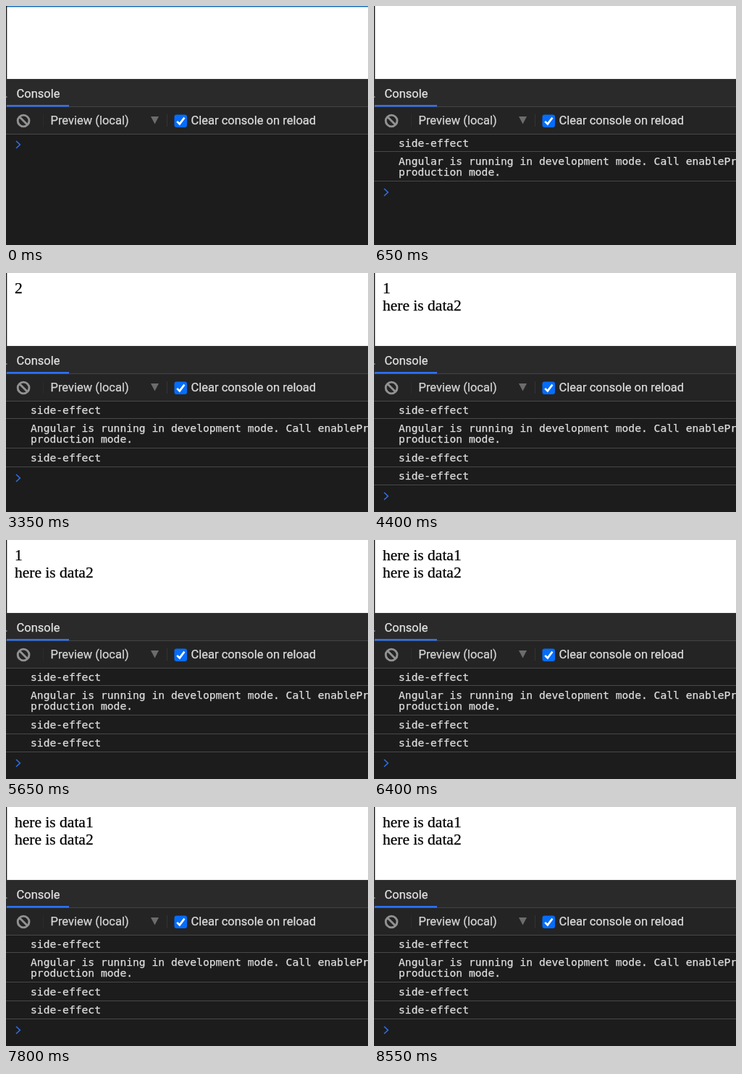
Animation of 500 by 331 pixels, one loop 8.6 s. Source, as an HTML page with a canvas:

```html
<!DOCTYPE html>
<html lang="en">
<head>
<meta charset="utf-8">
<title>Console</title>
<style>
html, body { margin: 0; width: 100%; height: 100%; overflow: hidden; background: #1c1c1c; }
canvas { display: block; width: 500px; height: 331px; }
</style>
</head>
<body>
<canvas id="stage" width="500" height="331"></canvas>
<script>
const ctx = document.getElementById('stage').getContext('2d');
const LOOP = 8600;
const UI = '16.5px Roboto, Arial, sans-serif';
const MONO = '14.65px "DejaVu Sans Mono", Menlo, monospace';
const SERIF = '21.5px "Liberation Serif", Times, serif';

// Each state: start time, page lines, number of console messages
const states = [
  { at: 0, page: [], count: 0 },
  { at: 350, page: [], count: 2 },
  { at: 2250, page: ['2'], count: 3 },
  { at: 4100, page: ['1', 'here is data2'], count: 4 },
  { at: 6050, page: ['here is data1', 'here is data2'], count: 4 }
];

const messages = [
  { lines: ['side-effect'], base: 195, end: 201 },
  { lines: ['Angular is running in development mode. Call enableProdMode() to enable',
            'production mode.'], base: 220, end: 242 },
  { lines: ['side-effect'], base: 261, end: 268 },
  { lines: ['side-effect'], base: 286, end: 293 }
];

function rect(x, y, w, h, color) {
  ctx.fillStyle = color;
  ctx.fillRect(x, y, w, h);
}

// A hairline stroke gives the slightly heavier smoothing of the glyphs
function text(str, x, y, font, color) {
  ctx.font = font;
  ctx.fillStyle = ctx.strokeStyle = color;
  ctx.lineWidth = 0.25;
  ctx.fillText(str, x, y);
  ctx.strokeText(str, x, y);
}

function line(points, width, color) {
  ctx.beginPath();
  points.forEach(([x, y]) => ctx.lineTo(x, y));
  ctx.lineWidth = width;
  ctx.strokeStyle = color;
  ctx.stroke();
}

function drawPage(state) {
  rect(0, 0, 500, 101, '#fff');
  state.page.forEach((str, i) => text(str, 12, 28 + i * 24, SERIF, '#000'));
  if (state.count === 0) rect(0, 0, 500, 1.4, '#1267b8');
}

function drawTabs() {
  rect(0, 101, 500, 38, '#2a2a2a');
  rect(0, 101, 500, 1, '#363636');
  rect(0, 139, 500, 1, '#444');
  text('Console', 14.5, 127, UI, '#e4e4e4');
  rect(1, 137, 86, 2.5, '#2e72f4');
  rect(0, 125, 1.5, 2, '#777');
}

function drawToolbar() {
  rect(0, 140, 500, 37, '#242424');
  rect(0, 177, 500, 1, '#484848');
  rect(51, 150, 1, 17, '#2c2c2c');
  rect(222, 150, 1, 17, '#343434');

  ctx.beginPath();
  ctx.arc(24.1, 159, 7.9, 0, Math.PI * 2);
  ctx.lineWidth = 2.9;
  ctx.strokeStyle = '#929292';
  ctx.stroke();
  line([[18.6, 153.5], [29.6, 164.5]], 2.9, '#929292');

  text('Preview (local)', 61.5, 164, UI, '#d6d6d6');
  ctx.beginPath();
  ctx.moveTo(200, 153);
  ctx.lineTo(211, 153);
  ctx.lineTo(205.5, 163.5);
  ctx.fillStyle = '#6c6c6c';
  ctx.fill();

  ctx.beginPath();
  ctx.roundRect(232.5, 150.5, 17.5, 17.5, 3);
  ctx.fillStyle = '#046dfb';
  ctx.fill();
  line([[236.2, 159.8], [239.8, 163.4], [246.4, 154.6]], 2.6, '#fff');
  text('Clear console on reload', 255.5, 164, UI, '#dedede');
}

function drawConsole(count) {
  rect(0, 178, 500, 153, '#1c1c1c');
  const shown = messages.slice(0, count);
  for (const m of shown) {
    m.lines.forEach((str, i) => text(str, 34, m.base + i * 15, MONO, '#dedede'));
    rect(0, m.end, 500, 1, '#484848');
  }
  const y = count ? shown[count - 1].end + 16 : 192;
  line([[14, y - 5], [19.3, y], [14, y + 5]], 1.6, '#2f70e8');
}

function draw(t) {
  const state = states.findLast(s => s.at <= t);
  drawPage(state);
  drawTabs();
  drawToolbar();
  drawConsole(state.count);
  rect(0, 0, 1.3, 101, '#161616');
}

const start = performance.now();
function tick() {
  draw((performance.now() - start) % LOOP);
  requestAnimationFrame(tick);
}
tick();
</script>
</body>
</html>
```
